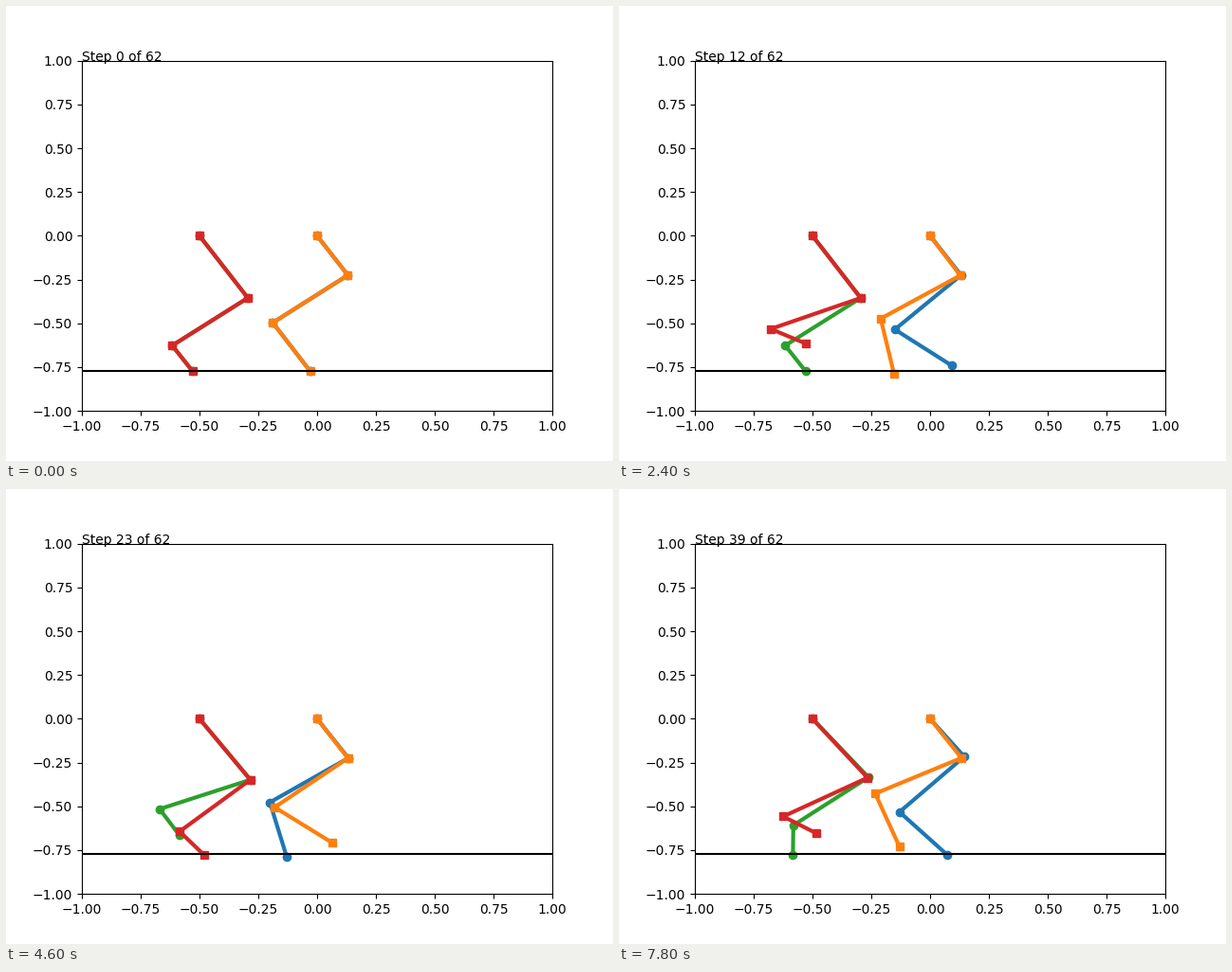
A matplotlib script that plays this animation: 640 by 480 pixels, repeating every 8 s.

```python
import numpy as np
import matplotlib.pyplot as plt
from matplotlib.animation import FuncAnimation

STEPS, SHOWN, CYCLE = 62, 40, 24
GROUND = -0.772

# Gait tables over one cycle: phase, then foot x, foot z
FRONT_X = ([1, 3, 7, 8, 9, 13, 15, 19, 21],
           [-.178, -.131, -.032, -.014, .009, .12, .073, -.028, -.081])
FRONT_Z = ([1, 3, 7, 8, 9, 13, 15, 19, 23],
           [-.785, -.728, -.571, -.614, -.642, -.774, -.777, -.787, -.787])
HIND_X = ([1, 3, 7, 9, 15, 19, 21],
          [-.53, -.485, -.381, -.43, -.583, -.68, -.643])
HIND_Z = ([1, 3, 7, 9, 15, 19, 20, 21],
          [-.583, -.653, -.772, -.777, -.777, -.772, -.766, -.742])

# Knee distance ahead of the hip
FRONT_KNEE = ([3, 7, 9, 13, 15, 19, 21],
              [.1215, .113, .1165, .132, .1335, .128, .1285])
GREEN_KNEE = ([0, 15, 19, 27, 31, 33, 39],
              [.2056, .2055, .206, .2278, .234, .234, .238])
RED_KNEE = ([0, 8, 15, 19, 27, 33, 39],
            [.2056, .2056, .204, .216, .216, .226, .234])


def cyclic(table, phase):
    return np.interp(phase, *table, period=CYCLE)


def foot_at(step, shift, rest_x, xs, zs, join, lifts):
    """Stand at rest, optionally lift straight up, then join the gait cycle."""
    if step >= join:
        return np.array([cyclic(xs, step + shift), cyclic(zs, step + shift)])
    z = GROUND
    if lifts:
        top = cyclic(zs, join + shift)
        z = np.interp(step, [join - 6, join], [GROUND, top])
    return np.array([rest_x, z])


def front_knee(step, shift, join, lifts):
    def gait(s):
        return cyclic(FRONT_KNEE, s + shift) + 0.0003 * s

    if step >= join:
        return gait(step)
    if not lifts:
        return 0.131
    return np.interp(step, [join - 6, join], [0.131, gait(join)])


def chain(hip_x, knee_dx, foot, lengths):
    """Points hip, knee, ankle, foot for a leg whose ankle bends backwards."""
    thigh, shin, shank = lengths
    hip = np.array([hip_x, 0.0])
    knee = hip + [knee_dx, -np.sqrt(thigh**2 - knee_dx**2)]
    dx, dy = foot - knee
    d = np.hypot(dx, dy)
    c = (d * d + shin**2 - shank**2) / (2 * d * shin)
    a = np.arctan2(dy, dx) - np.arccos(np.clip(c, -1, 1))
    ankle = knee + shin * np.array([np.cos(a), np.sin(a)])
    return np.array([hip, knee, ankle, foot]).T


def front_leg(step, shift, lifts):
    foot = foot_at(step, shift, -0.03, FRONT_X, FRONT_Z, 7, lifts)
    return chain(0.0, front_knee(step, shift, 7, lifts), foot,
                 (0.2604, 0.419, 0.318))


def hind_leg(step, shift, lifts, knee):
    foot = foot_at(step, shift, -0.53, HIND_X, HIND_Z, 13, lifts)
    return chain(-0.5, np.interp(step, *knee), foot, (0.41, 0.421, 0.169))


fig, ax = plt.subplots(figsize=(6.4, 4.8), dpi=100)
ax.set_xlim(-1, 1)
ax.set_ylim(-1, 1)
legs = [ax.plot([], [], color=f"C{i}", marker="os"[i % 2], lw=3)[0]
        for i in range(4)]
ax.plot([-1, 1], [GROUND, GROUND], color="black", lw=1.5)
label = ax.text(-1, 1, "")


def draw(step):
    poses = (front_leg(step, 0, True),
             front_leg(step, 12, False),
             hind_leg(step, 0, False, GREEN_KNEE),
             hind_leg(step, 12, True, RED_KNEE))
    for leg, pose in zip(legs, poses):
        leg.set_data(*pose)
    label.set_text(f"Step {step} of {STEPS}")
    return [*legs, label]


anim = FuncAnimation(fig, draw, frames=SHOWN, interval=200, repeat=True,
                     repeat_delay=0)
plt.show()
```
